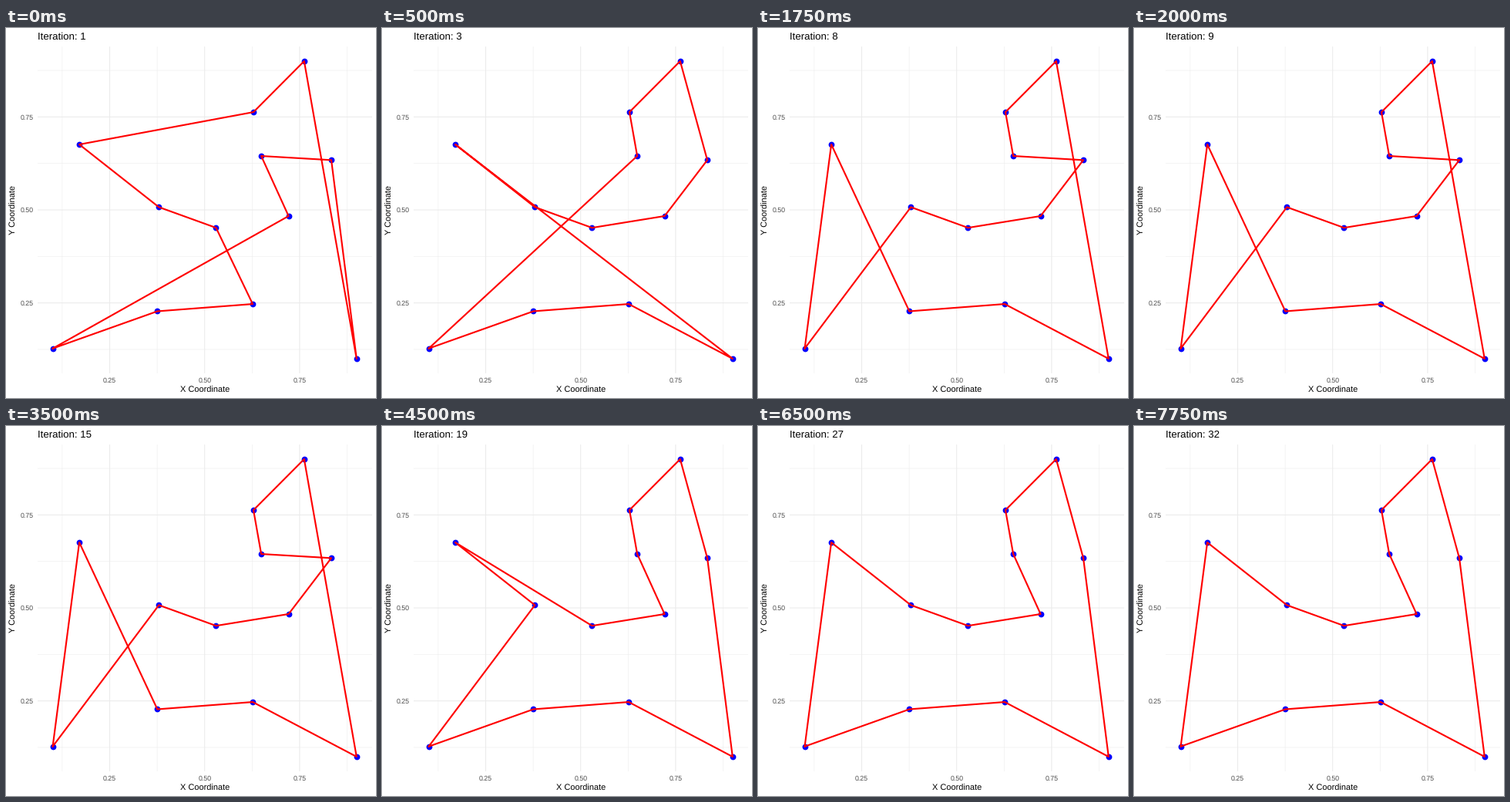
Recreate the animation shown at these times as a matplotlib script. Size 480 by 480 pixels, loop 8 s.

```python
import matplotlib.pyplot as plt
from matplotlib.animation import FuncAnimation

SIZE = 480
DPI = 72  # one point equals one pixel
FRAMES, INTERVAL = 32, 250

plt.rcParams["font.family"] = "Liberation Sans"
plt.rcParams["text.hinting"] = "none"

CITIES = {
    "a": (0.1, 0.1275), "b": (0.17, 0.676), "c": (0.3795, 0.5075),
    "d": (0.3755, 0.2275), "e": (0.53, 0.452), "f": (0.6265, 0.247),
    "g": (0.6285, 0.763), "h": (0.649, 0.645), "i": (0.721, 0.4835),
    "j": (0.762, 0.9), "k": (0.8335, 0.634), "l": (0.9, 0.1),
}

# Best tour, keyed by the iteration at which it is first found
TOURS = {
    1: "adfecbgjlkhi",
    3: "adflbceikjgh",
    8: "abdfljghkiec",
    16: "adflkjghiebc",
    27: "adflkjghiecb",
}

# Panel edges in pixels from the top left
LEFT, RIGHT, TOP, BOTTOM = 40.9, 474.5, 23.7, 448.3

fig = plt.figure(figsize=(SIZE / DPI, SIZE / DPI), dpi=DPI, facecolor="white")
ax = fig.add_axes([LEFT / SIZE, 1 - BOTTOM / SIZE,
                   (RIGHT - LEFT) / SIZE, (BOTTOM - TOP) / SIZE])
ax.set_xlim(0.06, 0.94)
ax.set_ylim(0.06, 0.94)
ax.axis("off")


def label(x, y, text, size, color="black", **kw):
    """Place text at a pixel position measured from the top left."""
    return fig.text(x / SIZE, 1 - y / SIZE, text, size=size, color=color, **kw)


def px(v):
    return LEFT + (v - 0.06) / 0.88 * (RIGHT - LEFT)


def py(v):
    return BOTTOM - (v - 0.06) / 0.88 * (BOTTOM - TOP)


def grid(values, width):
    for v in values:
        for line in (ax.axvline, ax.axhline):
            line(v, color="#ebebeb", lw=width, snap=False, zorder=1)


grid((0.125, 0.375, 0.625, 0.875), 0.53)
grid((0.25, 0.5, 0.75), 1.07)

for v in (0.25, 0.5, 0.75):
    label(px(v), 460, f"{v:.2f}", 8.8, "#4d4d4d", ha="center", va="baseline")
    label(36, py(v) + 3.2, f"{v:.2f}", 8.8, "#4d4d4d", ha="right", va="baseline")

label(px(0.5), 473, "X Coordinate", 11, ha="center", va="baseline")
label(13, py(0.5), "Y Coordinate", 11, rotation=90, rotation_mode="anchor",
      ha="center", va="baseline")
title = label(41, 15, "", 13.2, ha="left", va="baseline")

ax.plot(*zip(*CITIES.values()), "o", color="blue", ms=7.8, mew=0,
        snap=False, zorder=2)
route, = ax.plot([], [], color="red", lw=2.13, snap=False, zorder=3,
                 solid_joinstyle="round", solid_capstyle="round")


def update(frame):
    iteration = frame + 1
    tour = TOURS[max(k for k in TOURS if k <= iteration)]
    route.set_data(*zip(*(CITIES[c] for c in tour + tour[0])))
    title.set_text(f"Iteration: {iteration}")
    return route, title


anim = FuncAnimation(fig, update, frames=FRAMES, interval=INTERVAL,
                     repeat=True, repeat_delay=0)
plt.show()
```
